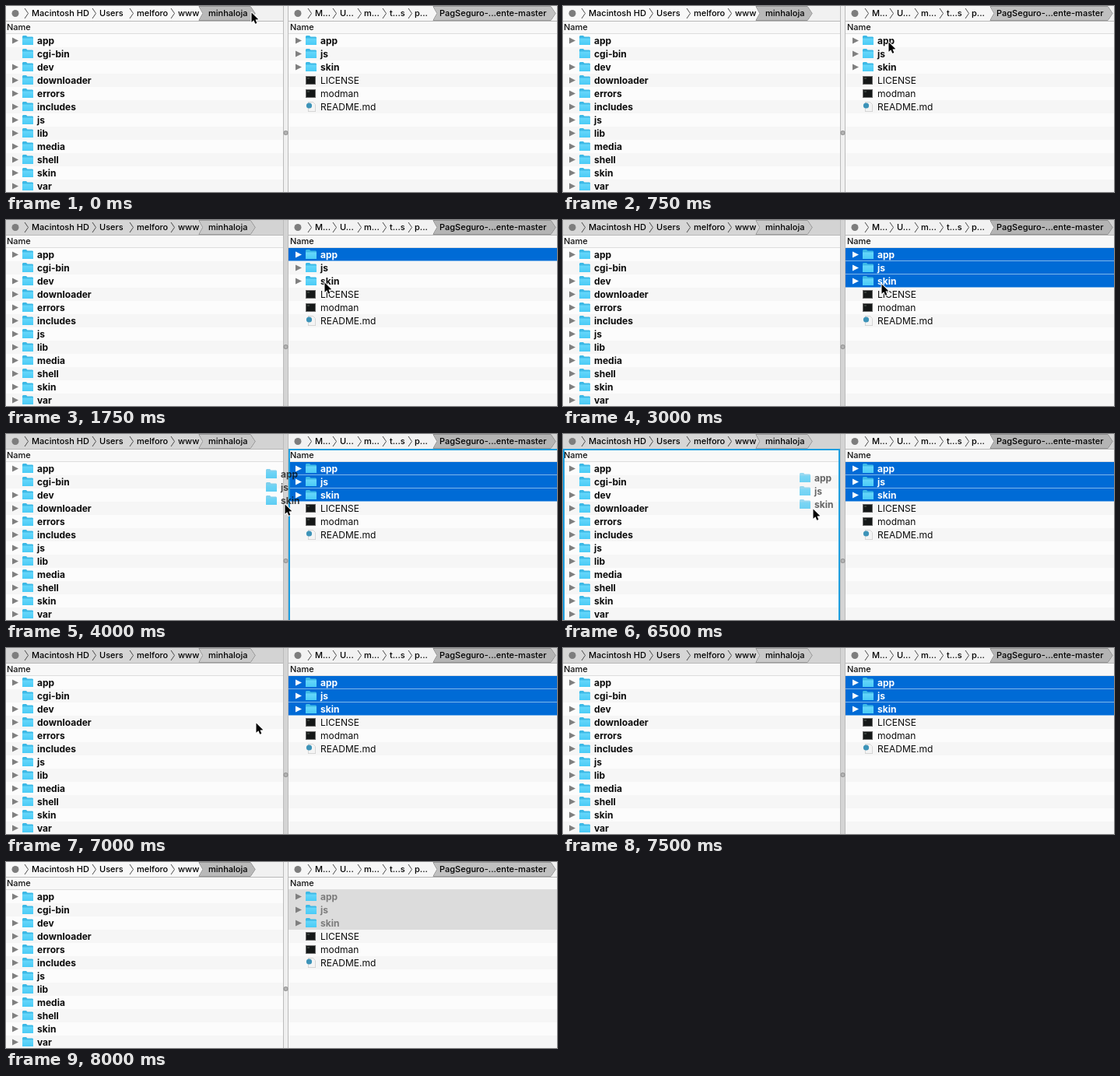
Recreate the animation shown at these times as an HTML page with a canvas. Size 708x239 px, loop 8500 ms.

```html
<!DOCTYPE html>
<html lang="pt">
<head>
<meta charset="utf-8">
<title>Copiando pastas</title>
<style>
html, body { margin: 0; width: 100%; height: 100%; overflow: hidden; background: #fff; }
canvas { display: block; width: 708px; height: 239px; }
</style>
</head>
<body>
<canvas id="stage" width="708" height="239"></canvas>
<script>
const W = 708, H = 239, LOOP = 8500, STEP = 250;
const ROW = 17, TOP = 36, BAR = 19;
const FONT = 'Inter, "Open Sans", sans-serif';
const ctx = document.getElementById('stage').getContext('2d');

const LEFT = {
  x: 0, w: 356, indent: 21, arrow: 8,
  crumbs: [['Macintosh HD', 33], ['Users', 120], ['melforo', 168], ['www', 221]],
  chevrons: [24, 111, 159, 212],
  pill: { text: 'minhaloja', x: 248, end: 320, tx: 260 },
  items: ['app', 'cgi-bin', 'dev', 'downloader', 'errors', 'includes',
          'js', 'lib', 'media', 'shell', 'skin', 'var']
};
// runs a little past the right edge of the stage
const RIGHT = {
  x: 363, w: 350, indent: 385, arrow: 372,
  crumbs: [['M...', 397], ['U...', 429], ['m...', 460], ['t...s', 493], ['p...', 525]],
  chevrons: [388, 420, 452, 484, 517],
  pill: { text: 'PagSeguro-...ente-master', x: 549, end: 706, tx: 557 },
  items: ['app', 'js', 'skin', 'LICENSE', 'modman', 'README.md']
};

// pointer stops: time, x, y
const POINTER = [
  [0, 315, 8], [250, 314, 14], [500, 409, 43], [750, 418, 46], [1250, 412, 73],
  [1500, 409, 79], [1750, 409, 80], [2000, 409, 81], [3000, 409, 82],
  [3500, 398, 84], [3750, 379, 86], [4000, 358, 90], [4250, 341, 94],
  [4500, 322, 95], [4750, 321, 96], [7250, 224, 96]
];

function rect(x, y, w, h, color) {
  ctx.fillStyle = color;
  ctx.fillRect(x, y, w, h);
}

function poly(points, fill, stroke, width = 1) {
  ctx.beginPath();
  points.forEach(([x, y], i) => i ? ctx.lineTo(x, y) : ctx.moveTo(x, y));
  if (fill) {
    ctx.closePath();
    ctx.fillStyle = fill;
  }
  if (stroke) {
    ctx.strokeStyle = stroke;
    ctx.lineWidth = width;
    ctx.stroke();
  }
  if (fill) ctx.fill();
}

function disc(x, y, r, color) {
  ctx.beginPath();
  ctx.arc(x, y, r, 0, Math.PI * 2);
  ctx.fillStyle = color;
  ctx.fill();
}

function label(text, x, y, size, color, weight = 400) {
  ctx.font = `${weight} ${size}px ${FONT}`;
  ctx.fillStyle = color;
  ctx.fillText(text, x, y);
}

function folder(x, y) {
  poly([[x, y + 1], [x + 1, y], [x + 5, y], [x + 6.5, y + 1.5], [x + 13, y + 1.5],
        [x + 14, y + 2.5], [x + 14, y + 12], [x, y + 12]], '#3cb9e6');
  const shade = ctx.createLinearGradient(0, y + 3, 0, y + 12);
  shade.addColorStop(0, '#68d8fb');
  shade.addColorStop(1, '#4acbf6');
  rect(x, y + 3.5, 14, 8.5, shade);
}

function binary(x, y) {
  rect(x, y + 1, 13, 11, '#6a6a6a');
  rect(x + 1, y + 2, 11, 9, '#151818');
  rect(x + 2, y + 3.5, 3, 1, '#59645a');
}

function page(x, y) {
  poly([[x + 3.5, y + 0.5], [x + 9.5, y + 0.5], [x + 12.5, y + 3.5], [x + 12.5, y + 12.5],
        [x + 3.5, y + 12.5]], '#f4f4f4', '#b9b9b9');
  disc(x + 4.5, y + 5, 3.6, '#3d93b8');
}

function pathBar(p, bar, strip, pillColor) {
  rect(p.x, 0, p.w, BAR, bar);
  const { x, end, text, tx } = p.pill;
  rect(p.x, 0, x + 6 - p.x, BAR, strip);
  disc(p.x + 12, 9.5, 4.5, '#7d7d7d');
  for (const c of p.chevrons)
    poly([[c, 3], [c + 4.5, 9.5], [c, 16]], null, '#4a4a4a');
  for (const [t, cx] of p.crumbs) label(t, cx, 13, 11, '#000', 500);
  poly([[x, 0.5], [end - 6, 0.5], [end, 9.5], [end - 6, 18.5], [x, 18.5], [x + 5, 9.5]],
       pillColor, '#6c6c6c');
  label(text, tx, 13, 11, '#000', 500);
  rect(p.x, BAR, p.w, 1, '#b9b9b9');
}

function list(p, picked, active) {
  rect(p.x, BAR + 1, p.w, TOP - BAR - 1, '#f8f8f8');
  label('Name', p.x + (p.x ? 2 : 1), 31, 11, '#111', 500);
  rect(p.x, TOP - 1, p.w, 1, '#dedede');
  for (let i = 0; i < 12; i++) {
    const y = TOP + i * ROW, on = i < picked;
    rect(p.x, y, p.w, ROW, on ? (active ? '#006bd6' : '#dcdcdc') : i % 2 ? '#f6f6f6' : '#fcfcfc');
    if (on && active) rect(p.x, y + ROW - 1, p.w, 1, '#7fb5eb');
    const name = p.items[i];
    if (!name) continue;
    const file = p === RIGHT && i > 2;
    if (!file && name !== 'cgi-bin')
      poly([[p.arrow, y + 4.5], [p.arrow + 8, y + 8.5], [p.arrow, y + 12.5]],
           on && active ? '#fff' : '#7f7f7f');
    const draw = !file ? folder : name === 'README.md' ? page : binary;
    draw(p.indent, y + 2);
    label(name, p.indent + 19, y + 13, 12,
          on ? (active ? '#fff' : '#7b7b7b') : '#0c0c0c', file ? 400 : 700);
  }
}

function dropFrame(p) {
  const c = '#1e9fe0';
  rect(p.x, BAR, p.w, 2, c);
  rect(p.x, BAR, 2, H - BAR, c);
  rect(p.x + p.w - 2, BAR, 2, H - BAR, c);
}

function ghost(dx, dy, alpha) {
  ctx.save();
  ctx.translate(dx, dy);
  ['app', 'js', 'skin'].forEach((name, i) => {
    const y = TOP + i * ROW;
    ctx.globalAlpha = alpha * 0.85;
    folder(RIGHT.indent, y + 2);
    ctx.globalAlpha = alpha;
    label(name, RIGHT.indent + 19, y + 13, 12, '#0c0c0c', 700);
  });
  ctx.restore();
}

function pointer(x, y) {
  ctx.save();
  ctx.translate(x + 0.5, y + 0.5);
  ctx.scale(0.88, 0.88);
  ctx.lineJoin = 'round';
  poly([[0, 0], [0, 14], [3.2, 11], [5.4, 16.2], [7.8, 15.2], [5.6, 10.2], [10, 10], [0, 0]],
       '#000', '#fff', 2.2);
  ctx.restore();
}

function render(t) {
  const focused = t >= 1000 && t < 8000;
  const picked = t < 1000 ? 0 : t < 2000 ? 1 : 3;
  const [, px, py] = POINTER.filter(p => p[0] <= t).pop();

  if (focused) {
    pathBar(LEFT, '#d3d3d3', '#d6d6d6', '#c9c9c9');
    pathBar(RIGHT, '#d3d3d3', '#f2f2f2', '#b4b4b4');
  } else {
    pathBar(LEFT, '#f1f1f1', '#f8f8f8', '#b9b9b9');
    pathBar(RIGHT, '#f1f1f1', '#f6f6f6', '#c0c0c0');
  }
  list(LEFT, 0, focused);
  list(RIGHT, picked, focused);

  rect(356, 0, 7, H, focused ? '#d4d4d4' : '#f0f0f0');
  rect(356, 0, 1, H, '#bcbcbc');
  rect(362, 0, 1, H, '#bcbcbc');
  disc(359.5, 163, 3, '#949494');
  disc(359.5, 163, 2, '#b4b4b4');

  if (t >= 3500 && t < 4250) dropFrame(RIGHT);
  if (t >= 4250 && t < 7000) dropFrame(LEFT);

  if (t >= 3500 && t < 6500) ghost(px - 409, py - 83, 0.75);
  else if (t >= 6500 && t < 6750) ghost(-81, 12, 0.62);
  else if (t >= 6750 && t < 7000) ghost(0, 0, 0.5);

  if (t < 7500) pointer(px, py);
}

const start = performance.now();
function tick() {
  const t = (performance.now() - start) % LOOP;
  render(Math.floor(t / STEP) * STEP);
  requestAnimationFrame(tick);
}
tick();
</script>
</body>
</html>
```
